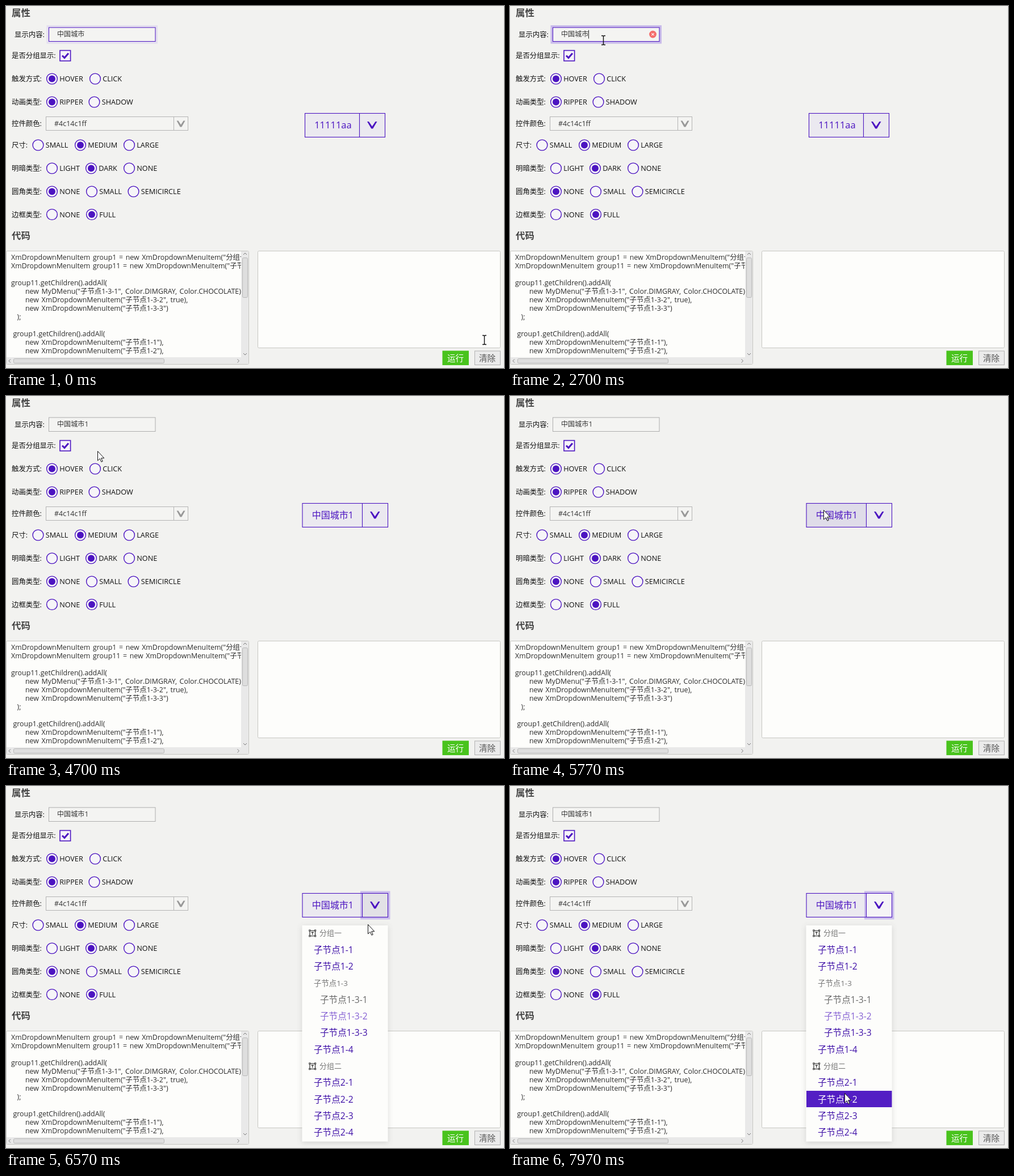
An HTML page that plays this animation: 877 px wide and 639 px high, repeating every 8000 ms.

```html
<!DOCTYPE html>
<html lang="zh-CN">
<head>
<meta charset="utf-8">
<style>
html, body { margin: 0; width: 100%; height: 100%; overflow: hidden; background: #f2f2f0; }
svg { display: block; width: 877px; height: 639px; }
text { font-family: "Open Sans", "Noto Sans CJK SC", "Noto Sans CJK", sans-serif; white-space: pre; }
</style>
</head>
<body>
<svg id="stage" viewBox="0 0 877 639" xmlns="http://www.w3.org/2000/svg">
<defs>
  <clipPath id="codeClip"><rect x="3" y="434" width="411" height="185"/></clipPath>
  <filter id="shade" x="-20%" y="-20%" width="140%" height="140%">
    <feDropShadow dx="0" dy="2" stdDeviation="5" flood-color="#666" flood-opacity=".24"/>
  </filter>
</defs>
</svg>
<script>
const NS = 'http://www.w3.org/2000/svg';
const stage = document.getElementById('stage');
const PURPLE = '#4c14c1';
const LOOP = 8000;

function el(tag, attrs, parent = stage) {
  const node = document.createElementNS(NS, tag);
  for (const k in attrs) node.setAttribute(k, attrs[k]);
  parent.appendChild(node);
  return node;
}
function text(x, y, str, size, fill, parent, more = {}) {
  const node = el('text', { x, y, 'font-size': size, fill, ...more }, parent);
  node.textContent = str;
  return node;
}
function box(x, y, width, height, fill, stroke, parent, more = {}) {
  return el('rect', { x, y, width, height, fill, stroke: stroke || 'none', ...more }, parent);
}
const path = (d, attrs, parent) => el('path', { d, fill: 'none', ...attrs }, parent);
const group = (parent) => el('g', {}, parent);
const show = (node, on) => node.setAttribute('visibility', on ? 'visible' : 'hidden');
const fade = (node, v) => node.setAttribute('opacity', v);
const ramp = (t, a, b) => Math.max(0, Math.min(1, (t - a) / (b - a)));
const within = (t, spans) => spans.some(([a, b]) => t >= a && t < b);
const inBox = (p, x, y, w, h) => p.x >= x && p.x <= x + w && p.y >= y && p.y <= y + h;

// Property form
text(10, 17.5, '属性', 16.4, '#444', stage, { 'font-weight': 700 });
text(10, 411, '代码', 16.4, '#444', stage, { 'font-weight': 700 });

const label = (x, y, str) => text(x, y + 4.6, str, 12.4, '#111');
label(15, 50, '显示内容:');
label(10, 87.5, '是否分组显示:');
label(10, 207.5, '控件颜色:');

function radioRow(y, name, options) {
  label(10, y, name);
  for (const [x, str, on] of options) {
    el('circle', { cx: x, cy: y, r: 9.4, fill: '#f6f5f8', stroke: PURPLE, 'stroke-width': 1.4 });
    if (on) el('circle', { cx: x, cy: y, r: 6, fill: PURPLE });
    text(x + 13.2, y + 4.6, str, 12.7, '#111');
  }
}
radioRow(128.5, '触发方式:', [[81, 'HOVER', 1], [157, 'CLICK']]);
radioRow(169.5, '动画类型:', [[81, 'RIPPER', 1], [155.5, 'SHADOW']]);
radioRow(245.5, '尺寸:', [[56.5, 'SMALL'], [131, 'MEDIUM', 1], [217, 'LARGE']]);
radioRow(286.5, '明暗类型:', [[81, 'LIGHT'], [150, 'DARK', 1], [217, 'NONE']]);
radioRow(327.5, '圆角类型:', [[81, 'NONE', 1], [151, 'SMALL'], [224.5, 'SEMICIRCLE']]);
radioRow(368, '边框类型:', [[81, 'NONE'], [151, 'FULL', 1]]);

box(95, 78.5, 18.6, 18.4, '#f6f5f8', PURPLE, stage, { 'stroke-width': 1.6 });
path('M99 87.5l4 4 7-8', { stroke: PURPLE, 'stroke-width': 3 });

box(70.5, 195.5, 250, 24, '#f4f4f2', '#b4b4b4');
path('M295.5 195.5v24', { stroke: '#b4b4b4' });
text(85, 212, '#4c14c1ff', 12.5, '#333');
const chevron = (x, y, w, h, fill, parent) =>
  path(`M${x} ${y}h3l${w / 2 - 3} ${h - 4} ${w / 2 - 3} ${4 - h}h3l${-w / 2 + 1.4} ${h}h-2.8z`, { fill }, parent);
chevron(300.5, 202.5, 15, 11, '#999');

// Text field
const glow = box(73.5, 36, 191.5, 28.5, 'none', '#c9bbea', stage, { 'stroke-width': 4 });
const field = box(75.5, 38, 187.5, 24.5, '#f4f4f2', PURPLE);
const fieldText = text(90, 54.4, '中国城市', 12.1, '#333');
const caret = path('M0 42.5v15', { stroke: '#222' });
const clear = group();
el('circle', { cx: 251.5, cy: 50, r: 6.4, fill: '#f56c6c' }, clear);
path('M249.3 47.8l4.4 4.4m0-4.4l-4.4 4.4', { stroke: '#fff', 'stroke-width': 1.1 }, clear);

// Code pane
box(0.5, 432.5, 427, 200, '#fdfdfb', '#c6c6c2', stage, { rx: 2 });
const code = el('g', { 'clip-path': 'url(#codeClip)' });
[
  [9, 'XmDropdownMenuItem group1 = new XmDropdownMenuItem("分组一", true);'],
  [9, 'XmDropdownMenuItem group11 = new XmDropdownMenuItem("子节点1-3");'],
  [9, ''],
  [9, 'group11.getChildren().addAll('],
  [34, 'new MyDMenu("子节点1-3-1", Color.DIMGRAY, Color.CHOCOLATE),'],
  [34, 'new XmDropdownMenuItem("子节点1-3-2", true),'],
  [34, 'new XmDropdownMenuItem("子节点1-3-3")'],
  [19.5, ');'],
  [9, ''],
  [12.5, 'group1.getChildren().addAll('],
  [34, 'new XmDropdownMenuItem("子节点1-1"),'],
  [34, 'new XmDropdownMenuItem("子节点1-2"),'],
].forEach(([x, str], i) => text(x, 447.6 + 15 * i, str, 12.4, '#2c2c2c', code, { 'word-spacing': 1.4 }));

box(414, 433, 13, 187, '#e9e9e9');
box(1, 620, 426, 12, '#e9e9e9');
const thumb = box(416.5, 444.5, 9, 70, '#dedede', '#b8b8b8', stage, { rx: 2 });
box(13.5, 622.5, 265, 8, '#dedede', '#b8b8b8', stage, { rx: 2 });
path('M418 439l3-3 3 3M418 613l3 3 3-3M8 623.5l-3 3 3 3M407.5 623.5l3 3-3 3', { stroke: '#777' });

// Output pane and buttons
box(443.5, 432.5, 427, 171, '#fdfdfb', '#c6c6c2', stage, { rx: 2 });
box(768.5, 608.5, 46.5, 25.5, '#49c31d');
text(777, 627, '运行', 14.6, '#fff');
box(825.5, 609, 45, 24.5, '#ebebeb', '#b2b2b2');
text(833, 627, '清除', 14.6, '#555');

// Dropdown button
function dropButton(x, width, split, str, size) {
  const g = group();
  const mid = x + split, w = width - split;
  box(x, 189.5, width, 42, '#ebe9f0', 'none', g);
  const leftHover = box(x, 189.5, split, 42, '#dfdce9', 'none', g);
  const arrowLit = box(mid, 189.5, w, 42, '#f5f4f6', 'none', g);
  const arrowHover = box(mid, 189.5, w, 42, '#e2e1e6', 'none', g);
  const ring = box(mid - 1.5, 187.5, w + 3.5, 46, 'none', '#cbbeec', g, { 'stroke-width': 4 });
  box(x, 189.5, width, 42, 'none', PURPLE, g, { 'stroke-width': 1.1 });
  path(`M${mid} 189.5v42`, { stroke: PURPLE, 'stroke-width': 1.1 }, g);
  text(x + 16.7, 216.3, str, size, PURPLE, g);
  chevron(mid + 13.5, 204, 17.5, 12.5, PURPLE, g);
  return { g, leftHover, arrowLit, arrowHover, ring };
}
const before = dropButton(526.5, 141, 96, '11111aa', 16.5);
const after = dropButton(522, 150.5, 105.5, '中国城市1', 16);
for (const part of ['leftHover', 'arrowLit', 'arrowHover', 'ring']) fade(before[part], 0);

// Popup menu
const menu = group();
box(521.5, 246, 151, 381.5, '#fdfdfb', 'none', menu, { filter: 'url(#shade)' });
const ROW = 29.35, TOP = 245.5, GREY = '#777', INK = '#3f10a8';
function groupIcon(y) {
  path(`M535 ${y - 4.5}h9.5v9.5h-9.5zM537.5 ${y - 1.6}h4.5M539.75 ${y - 1.6}v4.6`, { stroke: '#222', 'stroke-width': 1.1 }, menu);
  for (const x of [533.8, 543.5])
    for (const dy of [-5.7, 4]) box(x, y + dy, 2.2, 2.2, '#fdfdfb', '#222', menu, { 'stroke-width': 0.9 });
}
const rows = [
  ['分组一', 552, GREY, 13], ['子节点1-1', 542, INK], ['子节点1-2', 542, INK],
  ['子节点1-3', 542, GREY, 13.4], ['子节点1-3-1', 553, '#696969', 0, '#d2691e'],
  ['子节点1-3-2', 553, '#8560d3', 15.6], ['子节点1-3-3', 553, INK], ['子节点1-4', 542, INK],
  ['分组二', 552, GREY, 13], ['子节点2-1', 542, INK], ['子节点2-2', 542, INK],
  ['子节点2-3', 542, INK], ['子节点2-4', 542, INK],
].map(([str, x, fill, fixed, active = '#531ec4'], i) => {
  const y = TOP + ROW * i;
  const size = fixed || 15.6;
  const back = box(522, Math.floor(y - 0.5), 150.5, 29, active, 'none', menu);
  if (x === 552) groupIcon(y + 14.2);
  const tx = text(x, y + 14 + size * 0.37, str, size, fill, menu);
  return { back, tx, fill, y, live: !fixed };
});

// Pointer
const arrow = path('M0 0V16.5L3.8 13 6.4 18.8 8.7 17.8 6.2 12.2H11.3Z',
  { fill: '#fff', stroke: '#111', 'stroke-width': 1, 'stroke-linejoin': 'round' });
const beam = path('M-3.5-8h2.5l1 1 1-1h2.5M0-7v14M-3.5 8h2.5l1-1 1 1h2.5', { stroke: '#111', 'stroke-width': 1.4 });
const track = [
  [0, 842, 589], [30, 842, 589], [830, 155, 63.5], [870, 154, 64], [1000, 237, 46], [1700, 237, 46],
  [1900, 164, 60], [2700, 164, 60], [2870, 162, 73], [3000, 162, 73], [3270, 164, 58],
  [3900, 164, 58], [4370, 161, 97], [4700, 161, 97], [5000, 176, 107], [5500, 103, 94],
  [5770, 552, 201], [6050, 648, 208], [6330, 646, 222], [6570, 637, 244],
  [7170, 612, 400], [7930, 589, 542], [LOOP, 589, 542],
];
function pointer(t) {
  let i = 0;
  while (i < track.length - 2 && t >= track[i + 1][0]) i++;
  const [a, x, y] = track[i], [b, x2, y2] = track[i + 1];
  let k = ramp(t, a, b);
  if (t < 6330) k = k * k * (3 - 2 * k);
  return { x: x + (x2 - x) * k, y: y + (y2 - y) * k };
}

const TYPED = 3700, BLUR = 4370, OPEN = 6120;

function draw(t) {
  const p = pointer(t);
  const typed = t >= TYPED;
  const open = t >= OPEN;

  // Field: hover strengthens the focus ring, blur removes it
  const hover = ramp(t, 780, 870) - ramp(t, 2780, 2870) + ramp(t, 3100, 3240) - ramp(t, 4100, 4250);
  fade(glow, (0.35 + 0.65 * hover) * (1 - ramp(t, 4300, 4470)));
  field.setAttribute('stroke', t < BLUR ? PURPLE : '#adadad');
  fieldText.textContent = typed ? '中国城市1' : '中国城市';
  show(clear, within(t, [[810, 2790], [3100, 4150]]));
  show(caret, within(t, [[960, 1270], [1760, 2270], [2690, 3200], [3650, 4200]]));
  caret.setAttribute('transform', `translate(${typed ? 145.5 : 138.5} 0)`);
  thumb.setAttribute('height', typed ? 67 : 70);

  show(before.g, !typed);
  after.g.setAttribute('display', typed ? 'inline' : 'none');
  fade(after.leftHover, +inBox(p, 522, 189, 105, 43));
  fade(after.arrowLit, ramp(t, 6570, 6750));
  fade(after.arrowHover, ramp(t, 5950, 6050) - ramp(t, 6570, 6800));
  fade(after.ring, ramp(t, 6000, 6250));

  menu.setAttribute('display', open ? 'inline' : 'none');
  fade(menu, ramp(t, OPEN - 30, OPEN + 180));
  for (const r of rows) {
    const on = open && r.live && p.y >= r.y && p.y < r.y + ROW;
    r.back.setAttribute('display', on ? 'inline' : 'none');
    r.tx.setAttribute('fill', on ? '#fff' : r.fill);
  }

  const typing = !open && (inBox(p, 75, 37, 188, 26) || inBox(p, 443, 432, 428, 171));
  const at = `translate(${Math.round(p.x) + 0.5} ${Math.round(p.y) + 0.5})`;
  arrow.setAttribute('transform', at);
  beam.setAttribute('transform', at);
  show(arrow, !typing);
  show(beam, typing);
}

const start = performance.now();
function tick() {
  draw((performance.now() - start) % LOOP);
  requestAnimationFrame(tick);
}
draw(0);
requestAnimationFrame(tick);
</script>
</body>
</html>
```
